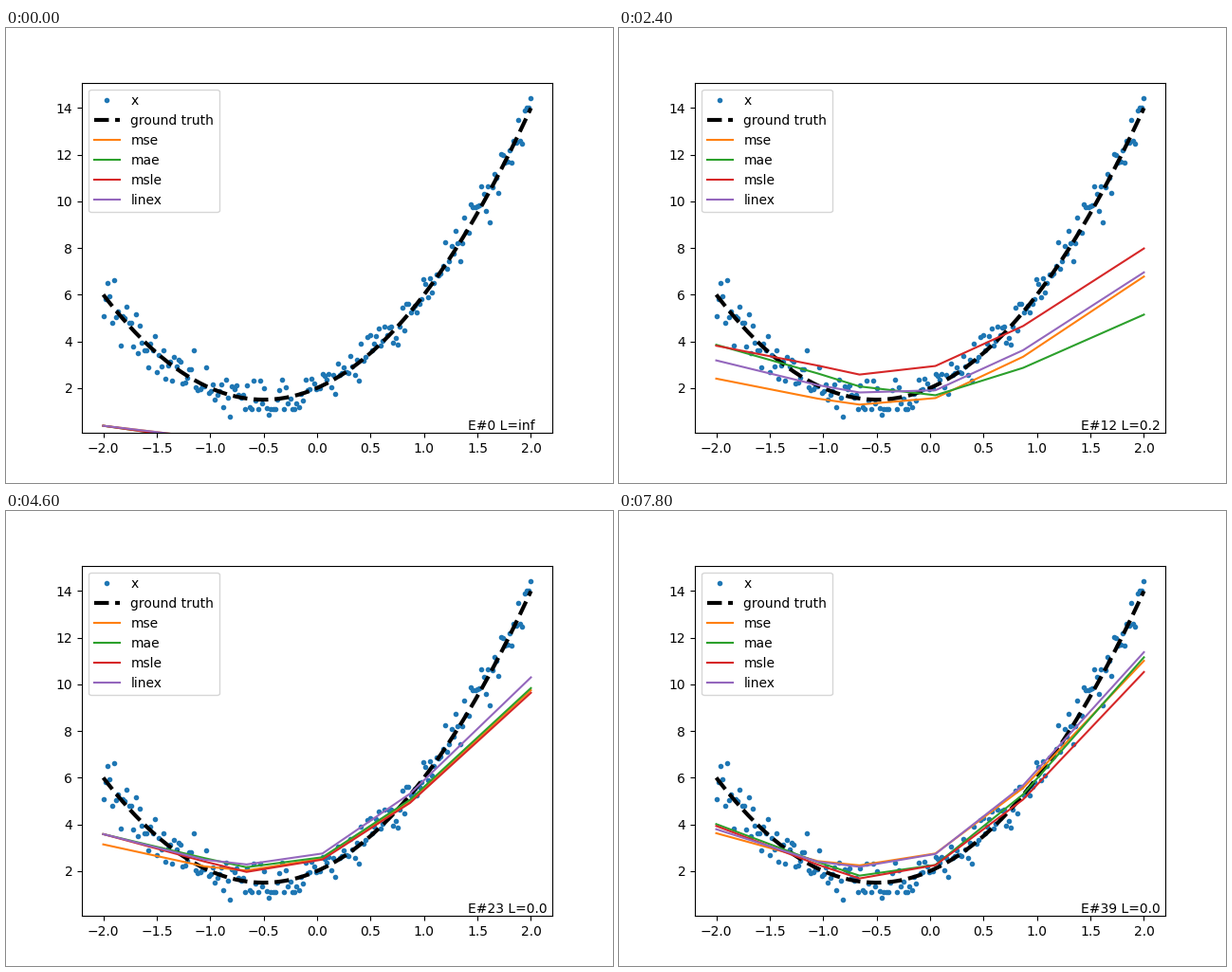
Animation of 640 by 480 pixels, one loop 8 s. Source, as a matplotlib script:

```python
import numpy as np
import matplotlib.pyplot as plt
from matplotlib.animation import FuncAnimation

EPOCHS = 40
STEP_MS = 200

# Each fit is a bent line. Its height at the left end, the two valley bends
# and the right end is posed at a few epochs and eased in log time.
BENDS = [-2, -0.66, 0.05, 2]
ELBOWS = [-1.05, 0.87]
POSE_EPOCHS = [0, 4, 9, 23, 39]
START = [0.38, -0.83, -0.90, -1.00]
POSES = {
    "mse": [[1.31, -0.03, -0.50, 1.86], [2.08, 0.92, 1.03, 5.37],
            [3.14, 2.02, 2.53, 9.75], [3.62, 2.24, 2.75, 11.01]],
    "mae": [[2.22, 0.43, -0.60, 0.25], [3.71, 1.78, 1.10, 3.30],
            [3.58, 2.16, 2.59, 9.84], [4.01, 1.80, 2.26, 11.16]],
    "msle": [[4.48, 1.85, -0.10, -0.20], [3.99, 2.61, 2.60, 6.41],
             [3.58, 1.96, 2.49, 9.64], [3.93, 1.68, 2.25, 10.53]],
    "linex": [[1.94, 0.31, -0.30, 1.55], [2.91, 1.46, 1.36, 5.37],
              [3.58, 2.28, 2.75, 10.30], [3.79, 2.18, 2.73, 11.38]],
}
# How much of the left descent is done at the elbow once training settles.
SAG = {"mse": 0.87, "mae": 0.74, "msle": 0.74, "linex": 0.87}

# A few samples that stray far from the curve, by index.
STRAYS = {0: 5.09, 5: 6.63, 8: 3.83, 21: 2.89, 42: 3.62, 59: 0.78, 77: 0.86,
          149: 6.67, 159: 8.25, 171: 9.88, 176: 10.65, 180: 9.10,
          193: 13.49, 195: 12.48, 199: 14.42}


def truth(x):
    return 2 * x**2 + 2 * x + 2


def log_time(epoch):
    return np.log(np.asarray(epoch) + 4.0)


def ease(rows, epoch):
    """Cubic Hermite blend of the poses at the given epoch."""
    rows, keys, now = np.array(rows), log_time(POSE_EPOCHS), log_time(epoch)
    slopes = np.gradient(rows, keys, axis=0)
    i = min(np.searchsorted(keys, now, side="right"), len(keys) - 1) - 1
    span = keys[i + 1] - keys[i]
    t = (now - keys[i]) / span
    rise = t * t * (3 - 2 * t)
    return (rows[i] * (1 - rise) + rows[i + 1] * rise
            + span * t * (1 - t) ** 2 * slopes[i]
            - span * t * t * (1 - t) * slopes[i + 1])


def fit(name, epoch):
    a, b, c, d = ease([START] + POSES[name], epoch)
    sag = SAG[name] - (SAG[name] - 0.6) * np.exp((4 - epoch) / 8)
    return [a, a + sag * (b - a), b, c, c + 0.34 * (d - c), d]


def loss_text(epoch):
    return "inf" if epoch == 0 else f"{0.65 * np.exp(-0.12 * epoch):.1f}"


x = np.linspace(-2, 2, 200)
rng = np.random.default_rng(4)
y = truth(x) + np.clip(rng.normal(0, 0.45, x.size), -0.8, 0.8)
y = np.clip(y, 1.1, 14)
y[list(STRAYS)] = list(STRAYS.values())

fig, ax = plt.subplots(figsize=(6.4, 4.8), dpi=100)
ax.set_xlim(-2.2, 2.2)
ax.set_ylim(0.072, 15.092)
ax.plot(x, y, ".", label="x")
ax.plot(x, truth(x), "k--", linewidth=3, label="ground truth")
knots = sorted(BENDS + ELBOWS)
lines = {name: ax.plot([], [], color=f"C{i}", label=name)[0]
         for i, name in enumerate(POSES, 1)}
status = ax.text(0.82, 0.01, "", transform=ax.transAxes)
ax.legend(loc="upper left")


def draw(epoch):
    for name, line in lines.items():
        line.set_data(knots, fit(name, epoch))
    status.set_text(f"E#{epoch} L={loss_text(epoch)}")
    return [*lines.values(), status]


anim = FuncAnimation(fig, draw, frames=EPOCHS, interval=STEP_MS,
                     repeat=True, repeat_delay=0)
plt.show()
```
